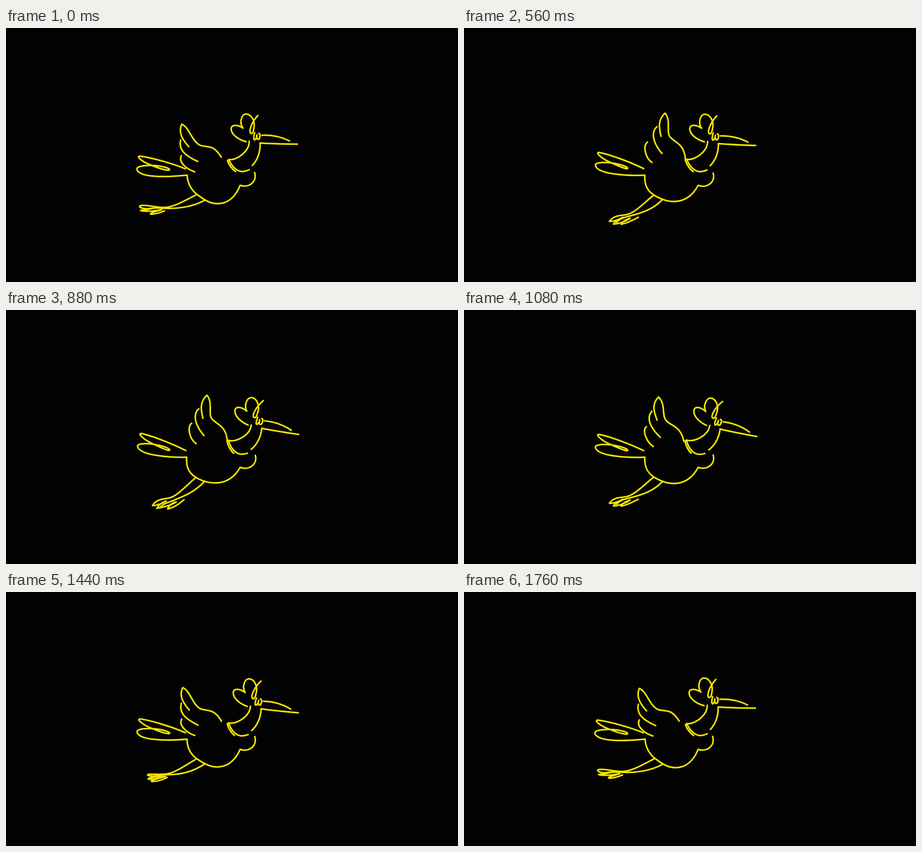
Animation of 998 by 561 pixels, one loop 1800 ms. Source, as an HTML page:

```html
<!DOCTYPE html>
<html lang="en">
<head>
<meta charset="utf-8">
<title>Flying bird</title>
<style>
html, body { margin: 0; width: 100%; height: 100%; overflow: hidden; background: #020202; }
svg { display: block; width: 100%; height: 100%; }
path { fill: none; stroke: #f0e300; stroke-width: 3.5; stroke-linecap: round; stroke-linejoin: round; }
</style>
</head>
<body>
<svg viewBox="0 0 998 561">
  <g id="bird"></g>
  <g id="head">
    <path d="M530 251C512 246 497 235 497 222C498 213 511 213 523 221C515 210 519 190 530 190C541 190 549 204 548 216C547 227 545 234 541 233C535 230 541 210 556 193"/>
    <path d="M549 231C547 238 546 247 549 247C552 246 554 240 554 236C553 242 554 246 557 246C561 246 563 232 558 233"/>
    <path d="M565 237C585 236 607 240 626 249.5"/>
    <path d="M643.5 256.5Q590 256 561 254C562 272 556 291 544 303.5"/>
    <path d="M537 250C538 272 510 293 492 290.5C497 303 507 316 521 317C528 317 533 315 537 313"/>
    <path d="M492 290.5L489 293C492 302 499 312 507 317"/>
  </g>
</svg>
<script>
const LOOP = 1800, STEP = 40;
const bird = document.getElementById('bird');
const head = document.getElementById('head');

// Eased 0..1 progress between two times.
const ease = (t, from, to) => {
  const x = Math.min(1, Math.max(0, (t - from) / (to - from)));
  return (1 - Math.cos(Math.PI * x)) / 2;
};

// A part passes smoothly through its poses, each placed at a knot of its driver.
function part(driver, knots, poses) {
  const el = bird.appendChild(document.createElementNS('http://www.w3.org/2000/svg', 'path'));
  const values = poses.map(p => p.match(/[\d.]+/g).map(Number));
  return { driver, el, draw(v) {
    const weights = knots.map((k, i) =>
      knots.reduce((w, other, j) => i === j ? w : w * (v - other) / (k - other), 1));
    let n = 0;
    el.setAttribute('d', poses[0].replace(/[\d.]+/g, () => {
      const sum = weights.reduce((s, w, i) => s + w * values[i][n], 0);
      n++;
      return sum.toFixed(2);
    }));
  } };
}

const TILT = [0, 0.957], LEGS = [0, 0.276, 0.77, 0.957], WING = [0, 0.65, 1];

const body = part('sway', TILT, [
  'M400 326C401 346 412 361 425 370C437 379 450 388 467 388C492 388 508 370 517 347.5C535 354 555 341 549 319',
  'M399 326C397 351 407 364 425 373C437 379 450 382 461 382C487 382 505 369 517 347.5C536 355 556 341 550.5 321']);

const tail = part('sway', TILT, [
  'M396 311C370 300 325 287 296 283C286 283 300 295 318 302C335 309 350 314 359 314C364 313 361 309 340 305C315 302 290 304 289 311C289 320 305 326 330 327.5C350 329 380 327 400 325',
  'M397 310.5C370 297 327 279 300 273C288 271 304 286 321 294C336 301 350 308 358 310C365 311 362 305 342 300C317 293 289 294 290.5 301C292 311 307 317 332 321C352 324 380 326 399 325']);

const foot = part('sway', LEGS, [
  'M421 368C400 378 375 394 354 396C335 398 314 390 298 392C289 394 301 402 323 398C314 402 303 401 297 403C303 406 330 405 344 401C336 404 318 408 319 411C328 412 340 408 350 404',
  'M420 369C400 380 375 399 357 402C342 405 325 402 315 404C309 407 325 408 347 407C332 409 316 410 315 414C322 417 338 411 353 408C340 412 321 416 322 419C333 420 347 415 357 410',
  'M418 370C402 382 384 402 368 409C354 417 334 409 321 427C331 428 342 423 351 418C343 421 333 428 330 433C341 433 357 427 367 420C359 422 349 428 347 433.5C360 431 372 425 385 418',
  'M418 371C402 384 385 404 369 412C354 420 335 413 323.5 432C334 432 345 427 354 422C345 424 336 432 333 438C345 436 365 431 376 424C367 425 359 433 357 439.5C369 437 383 428 393 419']);

const leg = part('sway', LEGS, [
  'M438 381C410 396 375 400 345 398C332 397 320 397 309 402',
  'M438 380C417 395 390 404 357 404C343 404 330 405 322 411',
  'M437 380C418 400 394 408 367 415C354 418 344 421 337 429',
  'M437 380C418 400 398 409 370 420.5C358 425 349 427 341 435']);

const wing = part('flap', WING, [
  'M403 262.5C390 248 379 232 387 213C404 220 409 250 428 259.5C445 265 457 256 475 285',
  'M423 245C416 229 408 211 424 194C441 211 433 231 442 244C450 257 475 253 484 289.5',
  'M435 239C431 222 427 203 444 188C458.5 206 444.5 232 456.5 242C467.5 254 486.5 256 489 291']);

const midFeather = part('flap', WING, [
  'M385 248C380 270 396 283 423 295',
  'M411 226C398 242 409 262 432 283',
  'M426 218C411 231 419 256 437 277']);

const lowFeather = part('flap', WING, [
  'M387 282.5C380 297 398 312 417 318',
  'M397 262C387 271 400 297 414 305',
  'M405 252C394 261 401 288 415 297']);

const parts = [body, tail, foot, leg, wing, midFeather, lowFeather];

function render(t) {
  const wingTime = t > 1750 ? t - LOOP : t;
  const drivers = {
    sway: ease(t, 65, 790) * (1 - ease(t, 740, 1790)),
    flap: ease(wingTime, -50, 570) * (1 - ease(wingTime, 845, 1545))
  };
  parts.forEach(p => p.draw(drivers[p.driver]));

  const drift = ease(t, 540, 880) * drivers.flap;
  lowFeather.el.setAttribute('transform', `translate(${5 * drift} ${-2 * drift})`);

  const nod = ease(t, 400, 1080) - ease(t, 1080, 1760);
  head.setAttribute('transform', `rotate(${9.7 * nod} 510 285)`);
}

const start = performance.now();
function tick() {
  const t = (performance.now() - start) % LOOP;
  render(Math.floor(t / STEP) * STEP);
  requestAnimationFrame(tick);
}
tick();
</script>
</body>
</html>
```
